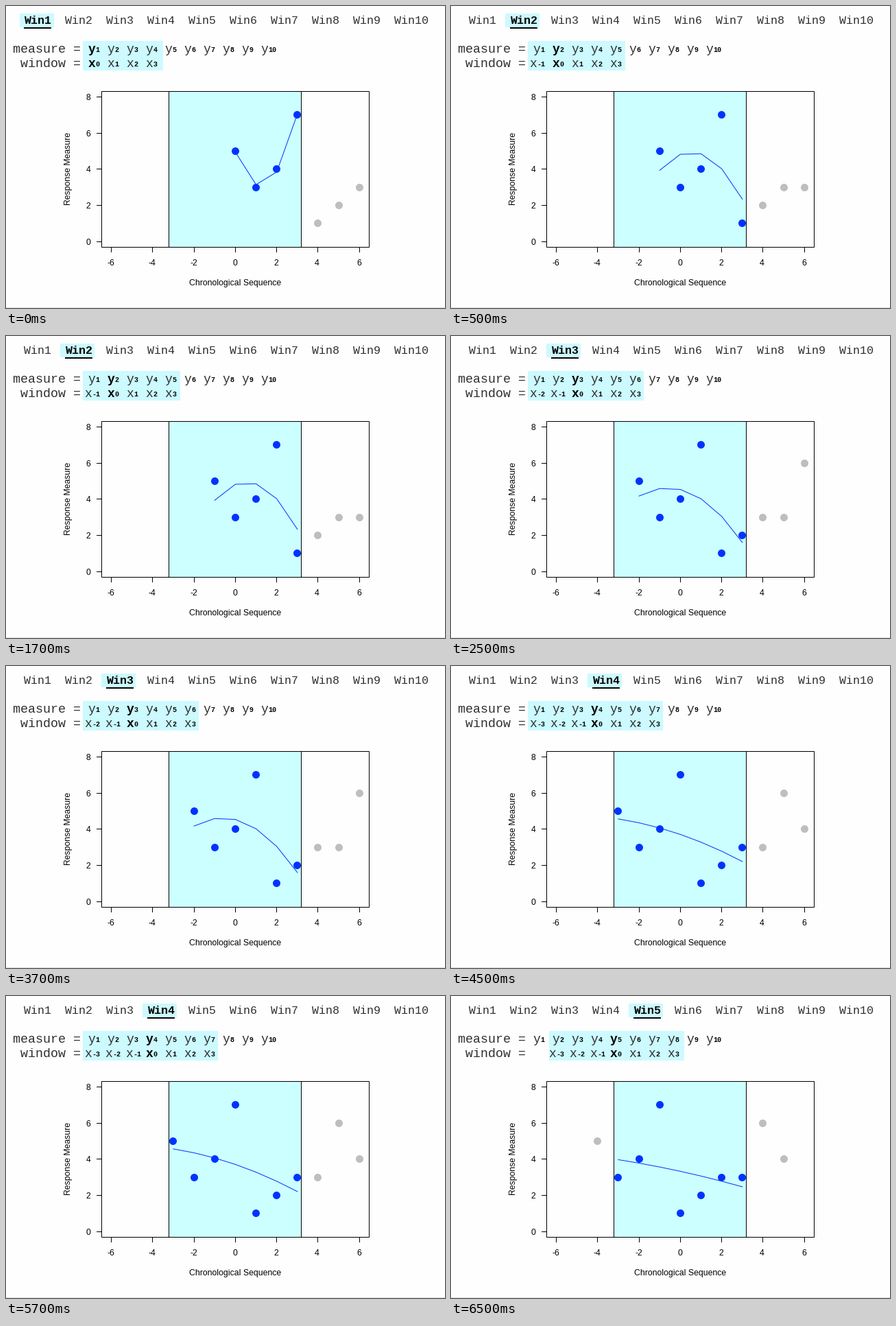
Animation of 640x440 px, one loop 8000 ms. Source, as a matplotlib script:

```python
import numpy as np
import matplotlib.pyplot as plt
from matplotlib.animation import FuncAnimation
from matplotlib.patches import Rectangle

W, H, DPI = 640, 440, 100
PT = 72 / DPI
SANS, MONO = "Liberation Sans", "Liberation Mono"
CYAN, PALE, BLUE, GREY = "#ccffff", "#ccfaff", "#0033ff", "#bebebe"

MEASURE = np.array([5, 3, 4, 7, 1, 2, 3, 3, 6, 4])
REACH = 3                       # half width of the moving window
COL_X, COL_STEP = 119.5, 28
SHADE_SPAN = [(112, 229), (112, 254), (112, 281), (112, 309), (143, 340)]
LEFT, RIGHT, TOP, BOTTOM = 139, 529, 124, 351
BAND = 237, 430

fig = plt.figure(figsize=(W / DPI, H / DPI), dpi=DPI, facecolor="#fefefe")
ax = fig.add_axes([0, 0, 1, 1])
ax.set_xlim(0, W)
ax.set_ylim(H, 0)
ax.axis("off")


def px(t):
    return 333.85 + 30.15 * t


def py(v):
    return 342.75 - 26.35 * v


def rect(x0, y0, x1, y1, z=1, **style):
    patch = Rectangle((x0, y0), x1 - x0, y1 - y0, zorder=z, **style)
    return ax.add_patch(patch)


def line(xs, ys, color="black", width=1, z=3, **style):
    return ax.plot(xs, ys, color=color, lw=width * PT, zorder=z, **style)[0]


def text(x, y, s, size, bold=False, font=MONO, color="#303030", **style):
    return ax.text(x, y, s, fontsize=size * PT, family=font, zorder=6,
                   weight="bold" if bold else "normal",
                   color="black" if bold else color, **style)


def label(x, y, s, ha="center", **style):
    return text(x, y, s, 12.3, font=SANS, color="black", ha=ha, **style)


def indexed(x, y, letter, index, bold):
    """A letter followed by a small bold subscript."""
    return [text(x, y, letter, 18, bold),
            text(x + 11, y - 1, str(index), 10, True)]


def dots(t, v, color):
    return ax.plot(px(t), py(v), "o", ms=11 * PT, mew=0, color=color,
                   zorder=5)[0]


def draw_static():
    text(9.5, 68, "measure =", 18.33)
    text(9.5, 89, " window =", 18.33)

    rect(BAND[0], TOP, BAND[1], BOTTOM, fc=CYAN, ec="none")
    for x in BAND:
        line([x, x], [TOP, BOTTOM])
    rect(LEFT, TOP, RIGHT, BOTTOM, z=4, fc="none", ec="black", lw=PT)

    for t in range(-6, 7, 2):
        x = round(px(t))
        line([x, x], [BOTTOM, BOTTOM + 7])
        label(x - 0.5, 378, str(t))
    for v in range(0, 9, 2):
        y = round(py(v))
        line([LEFT - 7, LEFT], [y, y])
        label(123.5, y + 5, str(v), ha="right")

    label(334, 407, "Chronological Sequence")
    label(91, 236.5, "Response Measure", va="center", rotation=90)
    line([0, W], [439, 439], color="#dedede")


def draw_header(k):
    left = 20 + 60 * k - (k > 0)
    parts = [rect(left, 11, left + 50, 31, fc=PALE, ec="none"),
             line([26 + 60 * k, 66 + 60 * k], [32, 32], width=2,
                  solid_capstyle="butt")]
    for i in range(10):
        parts.append(text(26.5 + 60 * i, 26, f"Win{i + 1}", 16.67, i == k))
    return parts


def draw_sequences(k, first, last):
    x0, x1 = SHADE_SPAN[k]
    parts = [rect(x0, 51, x1, 94, fc=PALE, ec="none")]
    for i in range(len(MEASURE)):
        parts += indexed(COL_X + COL_STEP * i, 68, "y", i + 1, i == k)
    for i in range(first, last + 1):
        x = COL_X + COL_STEP * i
        if i < k:               # the minus sign pushes these to the left
            x = COL_X + COL_STEP * first - 5 + 30 * (i - first)
        parts += indexed(x, 89, "x", i - k, i == k)
    return parts


def draw_plot(k):
    t = np.arange(len(MEASURE)) - k
    inside = np.abs(t) <= REACH
    outside = ~inside & (np.abs(t) <= 6)
    tw, vw = t[inside], MEASURE[inside]
    fit = np.polyval(np.polyfit(tw, vw, 2), tw)
    return [dots(tw, vw, BLUE),
            dots(t[outside], MEASURE[outside], GREY),
            line(px(tw) + 0.5, py(fit) + 0.5, color=BLUE)]


def draw_scene(k):
    first, last = max(0, k - REACH), k + REACH
    return draw_header(k) + draw_sequences(k, first, last) + draw_plot(k)


draw_static()
scenes = [draw_scene(k) for k in range(5)]


def update(frame):
    current = (frame + 3) // 4
    for k, scene in enumerate(scenes):
        for artist in scene:
            artist.set_visible(k == current)
    return scenes[current]


anim = FuncAnimation(fig, update, frames=16, interval=500, repeat=True,
                     repeat_delay=0, blit=False)
plt.show()
```
